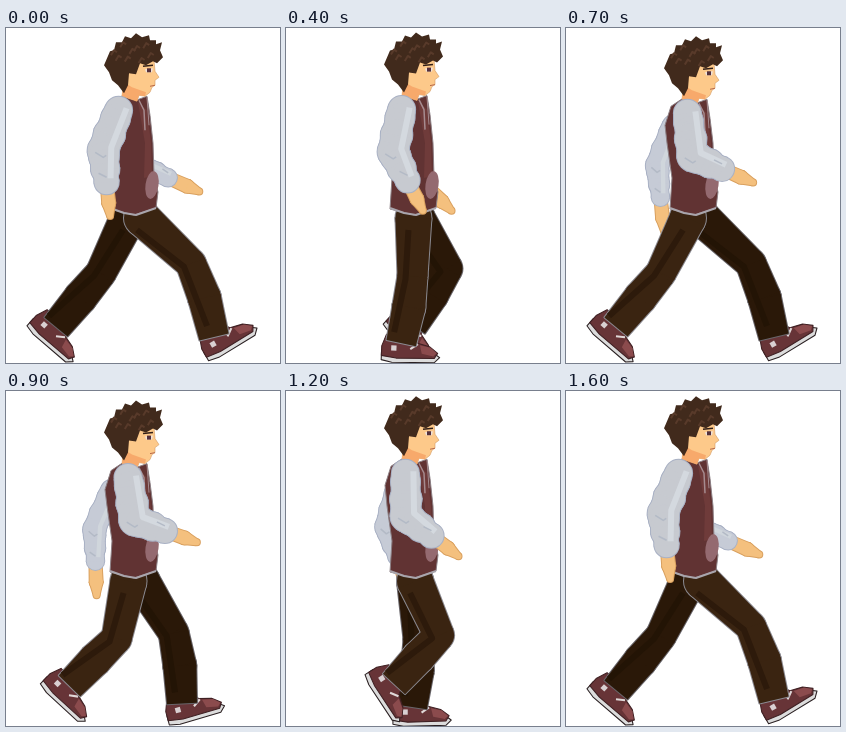
Recreate the animation shown at these times as an HTML page with a canvas. Size 274 px wide and 335 px high, loop 1.7 s.

```html
<!DOCTYPE html>
<html>
<head>
<meta charset="utf-8">
<title>Walk cycle</title>
<style>
html, body { margin: 0; width: 100%; height: 100%; overflow: hidden; background: #fff; }
canvas { display: block; }
</style>
</head>
<body>
<canvas id="stage" width="274" height="335"></canvas>
<script>
const ctx = document.getElementById('stage').getContext('2d');
const TAU = Math.PI * 2;
const wave = phase => Math.cos(phase * TAU);
const mix = (a, b, k) => a + (b - a) * k;

// One stride in eight equal parts, shared by both legs
const stride = [
  { x: 208, y: 304, tilt: -30, bend: 17 }, // contact
  { x: 144, y: 311, tilt: 0, bend: 10 },   // down
  { x: 126, y: 311, tilt: 0, bend: 5 },    // passing
  { x: 88, y: 308, tilt: 8, bend: 5 },     // push
  { x: 50, y: 294, tilt: 42, bend: 9 },    // trailing
  { x: 77, y: 286, tilt: 46, bend: 29 },   // lift
  { x: 108, y: 288, tilt: 58, bend: 35 },  // swing
  { x: 172, y: 304, tilt: 3, bend: 28 }    // reach
];

function pose(phase) {
  const t = (phase % 1) * 8, i = Math.floor(t);
  const a = stride[i], b = stride[(i + 1) % 8], out = {};
  for (const key in a) out[key] = mix(a[key], b[key], t - i);
  return out;
}

function trace(p) {
  ctx.beginPath();
  for (let i = 0; i < p.length; i += 2) ctx.lineTo(p[i], p[i + 1]);
}

function line(p, color, width = 1) {
  trace(p);
  ctx.strokeStyle = color;
  ctx.lineWidth = width;
  ctx.stroke();
}

function shape(p, fill, edge, width = 1) {
  trace(p);
  ctx.closePath();
  ctx.fillStyle = fill;
  ctx.fill();
  if (!edge) return;
  ctx.strokeStyle = edge;
  ctx.lineWidth = width;
  ctx.stroke();
}

// Tapered chain of [x, y, radius] joints; the edge lies under the fill
function limb(joints, fill, edge, flatEnd) {
  ctx.fillStyle = fill;
  ctx.strokeStyle = edge;
  ctx.lineWidth = 2;
  for (const paint of ['stroke', 'fill']) {
    joints.forEach(([x, y, r], i) => {
      if (!flatEnd || i < joints.length - 1) {
        ctx.beginPath();
        ctx.arc(x, y, r, 0, TAU);
        ctx[paint]();
      }
      if (!i) return;
      const [px, py, pr] = joints[i - 1];
      const d = Math.hypot(x - px, y - py);
      const nx = (py - y) / d, ny = (x - px) / d;
      trace([px + nx * pr, py + ny * pr, x + nx * r, y + ny * r,
             x - nx * r, y - ny * r, px - nx * pr, py - ny * pr]);
      ctx.closePath();
      ctx[paint]();
    });
  }
}

function shoe(x, y, tilt) {
  ctx.save();
  ctx.translate(x, y);
  ctx.rotate(tilt * TAU / 360);
  ctx.scale(1.06, 1.06);
  shape([-18, 12, -18, 21, -8, 23, 32, 22, 37, 17, 30, 12], '#dcdcdc', '#2a2022');
  shape([-14, -3, -18, 8, -18, 17, -4, 19, 32, 18, 35, 13, 27, 7, 15, 4, 10, -3], '#673437', '#3f2023');
  shape([18, 6, 28, 8, 34, 13, 31, 16, 20, 14], '#8b4b4d');
  shape([-9, 7, -4, 7, -4, 12, -9, 12], '#d9d0d2');
  line([9, 10, 16, 5], '#e0d8d8', 2);
  ctx.restore();
}

function leg(phase, fill, shade, edge) {
  const { x, y, tilt, bend } = pose(phase);
  const hx = 129 + 7 * wave(phase), hy = 190;
  const dx = x - hx, dy = y - hy, d = Math.hypot(dx, dy);
  const kx = hx + dx * .48 + dy / d * bend;
  const ky = hy + dy * .48 - dx / d * bend;
  shoe(x, y, tilt);
  limb([[hx, hy, 18], [kx, ky, 15], [mix(kx, x, .5) + 2, mix(ky, y, .5), 16.5], [x, y + 5, 15]],
       fill, edge, true);
  line([hx - 5, hy + 12, kx - 7, ky + 3, x - 7, y - 6], shade, 6);
}

// swing runs from -1 (back) to 1 (forward)
function arm(swing, sway, top, size, fill, light) {
  const upper = -.12 + .28 * swing, fore = .63 + .6 * swing;
  const sx = 117 + sway * swing;
  const ex = sx + 43 * Math.sin(upper), ey = top + 43 * Math.cos(upper);
  const along = k => [ex + k * Math.sin(fore), ey + k * Math.cos(fore)];
  const [wx, wy] = along(32);
  limb([[wx, wy, 6], [...along(53), 6.5], [...along(66), 3]], '#f4c07e', '#d9a05f');

  // Puffy sleeve
  const sleeve = [];
  for (let i = 0; i <= 10; i++) {
    const k = i / 5;
    const [x, y] = k < 1 ? [mix(sx, ex, k), mix(top, ey, k)] : along(32 * (k - 1));
    const r = 13.5 + 1.8 * Math.sin(k * Math.PI / 2) + .8 * Math.sin(i * 2.6) - (k > 1 ? 2 * (k - 1) : 0);
    sleeve.push([x, y, r * size]);
  }
  limb(sleeve, fill, '#a9b1c4');
  const s = 8 * size;
  line([sx + s, top - 2, ex + s, ey - 3, wx + s / 2, wy - 4], light, 6 * size);
  line([ex - s, ey + 2, ex, ey + 7, ex + 3, ey + 5], '#b3bac6', 1.5);
  line([wx - s, wy - 9, wx, wy - 5], '#b3bac6', 1.5);
}

function torso(dy) {
  shape([117, 65 + dy, 130, 70 + dy, 141, 66 + dy, 144, 85 + dy, 147, 115, 148, 148,
         152, 164, 150, 180, 128, 187, 104, 181, 106, 150, 101, 115, 99, 92 + dy, 105, 73 + dy],
        '#613333', '#8c8085');
  shape([132, 72 + dy, 141, 80 + dy, 145, 115, 146, 148, 138, 150, 139, 115], '#6f3b3a');
  ctx.beginPath();
  ctx.ellipse(146, 157, 6.5, 14, .15, 0, TAU);
  ctx.fillStyle = '#946a70';
  ctx.fill();
  line([104, 180, 118, 185, 130, 187, 150, 180], '#a9a5ac', 2);
  line([133, 70 + dy, 138, 80 + dy, 139, 100 + dy], '#a58b8f', 1.5);
  line([141, 67 + dy, 143, 95 + dy], '#a58b8f');
}

function head(dy) {
  ctx.save();
  ctx.translate(0, dy);
  shape([122, 32, 148, 30, 149, 41, 153, 47, 149, 50, 149, 55, 146, 57, 144, 62,
         139, 66, 133, 65, 131, 71, 116, 66, 118, 48], '#fdc98a', '#d49a62', .6);
  shape([118, 52, 126, 57, 140, 62, 139, 66, 133, 65, 131, 71, 116, 66], '#f7a96b');
  shape([98, 35, 104, 21, 108, 20, 110, 12, 116, 12, 119, 6, 125, 8, 130, 3, 136, 7,
         143, 5, 144, 10, 150, 10, 150, 14, 156, 12, 154, 20, 157, 27, 151, 33,
         147, 31, 140, 35, 134, 33, 130, 44, 123, 43, 122, 55, 118, 63,
         112, 55, 106, 50, 103, 42], '#412a1c');
  for (let i = 0; i < 9; i++) {
    const x = 108 + i * 4.6, y = 20 + 8 * Math.sin(i * 2.4);
    line([x - 3, y + 5, x, y, x + 3, y + 2], '#583a2a', 2);
  }
  line([137, 36, 147, 35], '#321f18', 1.5);
  shape([139, 39, 147, 38, 146, 42, 140, 42], '#eee1d8');
  shape([141, 38, 145, 38, 145, 42, 141, 42], '#54303c');
  line([144, 56, 149, 55], '#b96a4a');
  ctx.restore();
}

function draw(phase) {
  const dy = 3 + 2.5 * wave(2 * phase - .2) - 1.5 * wave(phase);
  const swing = -wave(phase - .08);
  ctx.clearRect(0, 0, 274, 335);
  ctx.lineJoin = 'round';
  arm(-swing, 12, 92 + dy, .72, '#c6cbd6', '#d0d6dc');
  leg(phase + .5, '#2a1808', '#231405', '#68656a');
  leg(phase, '#3a2411', '#2d1a0b', '#8b8a91');
  torso(dy);
  head(dy);
  arm(swing, 5, 80 + dy, 1, '#c7cad0', '#d4d9df');
}

const start = performance.now();
function tick() {
  // Ticks 7 and 8 both land on mid-stride, so that pose is held
  const n = Math.floor((performance.now() - start) % 1700 / 100);
  draw(n < 8 ? n / 14 : n / 16);
  requestAnimationFrame(tick);
}
tick();
</script>
</body>
</html>
```
